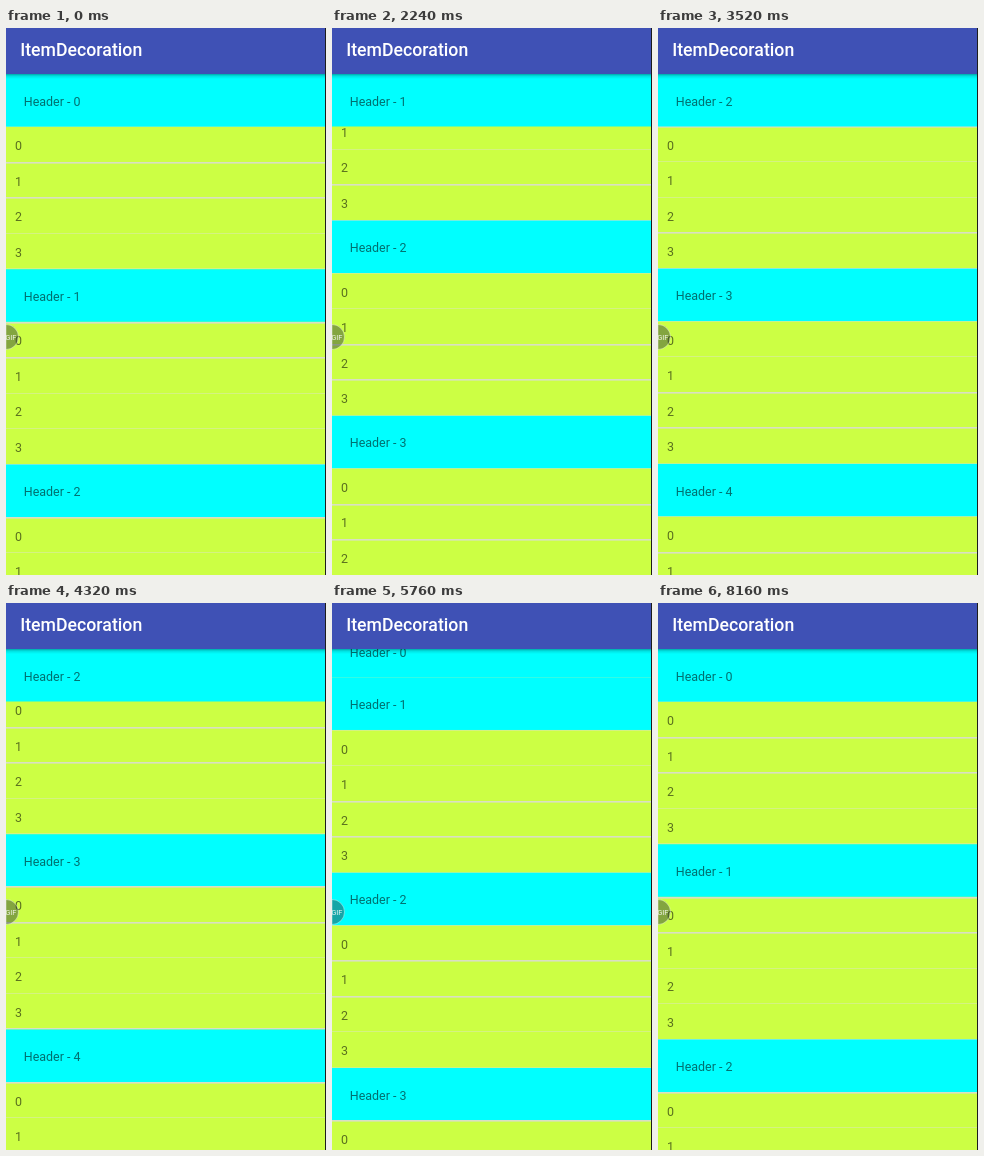
An HTML page with a canvas that plays this animation: 320 px wide and 547 px high, repeating every 9760 ms.

```html
<!DOCTYPE html>
<html lang="en">
<head>
<meta charset="utf-8">
<title>ItemDecoration</title>
<style>
  html, body { margin: 0; width: 100%; height: 100%; overflow: hidden; background: #cf4; }
  canvas { display: block; width: 320px; height: 547px; }
</style>
</head>
<body>
<canvas id="stage"></canvas>
<script>
const W = 320, H = 547, LOOP = 9760, TICK = 160;
const BAR = 46, HEADER = 52.5, GAP = .75, ROW = 35.5, ROWS = 4;
const GROUP = HEADER + GAP + ROWS * ROW;
const FONT = 'Roboto, sans-serif';

// Each swipe: start time, number of ticks, final scroll offset.
const swipes = [
  [800, 7, 184.6],
  [1920, 7, 335.45],
  [3040, 6, 410.6],
  [4320, 7, 228.3],
  [5440, 7, 72],
  [6560, 4, 20],
  [7520, 5, 0]
];

const canvas = document.getElementById('stage');
const ctx = canvas.getContext('2d');
const ratio = window.devicePixelRatio || 1;
canvas.width = W * ratio;
canvas.height = H * ratio;
ctx.scale(ratio, ratio);

const smooth = p => p * p * (3 - 2 * p);
const mod = (a, n) => ((a % n) + n) % n;

function scrollAt(time) {
  let offset = 0;
  for (const [start, ticks, end] of swipes) {
    if (time < start) break;
    const step = Math.floor((time - start) / TICK) + 1;
    offset += (end - offset) * smooth(Math.min(1, step / ticks));
  }
  return offset;
}

function rect(x, y, w, h, color) {
  ctx.fillStyle = color;
  ctx.fillRect(x, y, w, h);
}

function text(string, x, y, font, color) {
  ctx.font = `${font} ${FONT}`;
  ctx.fillStyle = color;
  ctx.fillText(string, x, y);
}

// Baselines sit on whole pixels to keep the glyphs crisp.
const label = (string, x, y) =>
  text(string, x, Math.round(y), '12.44px', 'rgba(0,0,0,.56)');

function header(index, y) {
  rect(0, y, W, HEADER, '#0ff');
  label(`Header - ${index}`, 17.8, y + 31.7);
}

function divider(y, strong) {
  rect(0, Math.round(y) - 1, W, strong ? 1.6 : 1, strong ? '#d9dfc4' : 'rgba(222,222,222,.4)');
}

function list(scroll) {
  rect(0, 0, W, H, '#cf4');
  // Dividers stay sharp only at some subpixel positions.
  const phase = 1 + Math.round(mod(scroll, 1) * 3);
  const first = Math.floor(scroll / GROUP);

  for (let g = first; g < first + 5; g++) {
    const top = BAR + g * GROUP - scroll;
    header(g, top);
    for (let i = 0; i <= ROWS; i++) {
      const y = top + HEADER + GAP + i * ROW;
      if (i < ROWS) label(i, 8.9, y + 22.9);
      divider(y, mod(g * 5 + i - phase, 4) < 2);
    }
  }

  const nextTop = BAR + (first + 1) * GROUP - scroll;
  header(first, Math.min(BAR, nextTop - HEADER));
}

function appBar() {
  const shadow = ctx.createLinearGradient(0, BAR, 0, BAR + 5);
  shadow.addColorStop(0, 'rgba(0,0,0,.34)');
  shadow.addColorStop(.4, 'rgba(0,0,0,.12)');
  shadow.addColorStop(1, 'rgba(0,0,0,0)');
  rect(0, BAR, W, 5, shadow);
  rect(0, 0, W, BAR, '#3f51b5');
  text('ItemDecoration', 14.2, 28, '500 17.7px', '#fff');
}

function bubble() {
  ctx.beginPath();
  ctx.arc(0, 309, 12.5, -Math.PI / 2, Math.PI / 2);
  ctx.closePath();
  ctx.fillStyle = 'rgba(45,58,60,.46)';
  ctx.fill();
  ctx.strokeStyle = 'rgba(255,255,255,.4)';
  ctx.lineWidth = 1;
  ctx.stroke();
  text('GIF', -.8, 311.6, '7.5px', 'rgba(255,255,255,.9)');
}

function draw(now) {
  list(scrollAt(now % LOOP));
  appBar();
  bubble();
  rect(W - 1, 0, 1, H, '#1c1c1c');
  requestAnimationFrame(draw);
}

requestAnimationFrame(draw);
</script>
</body>
</html>
```
